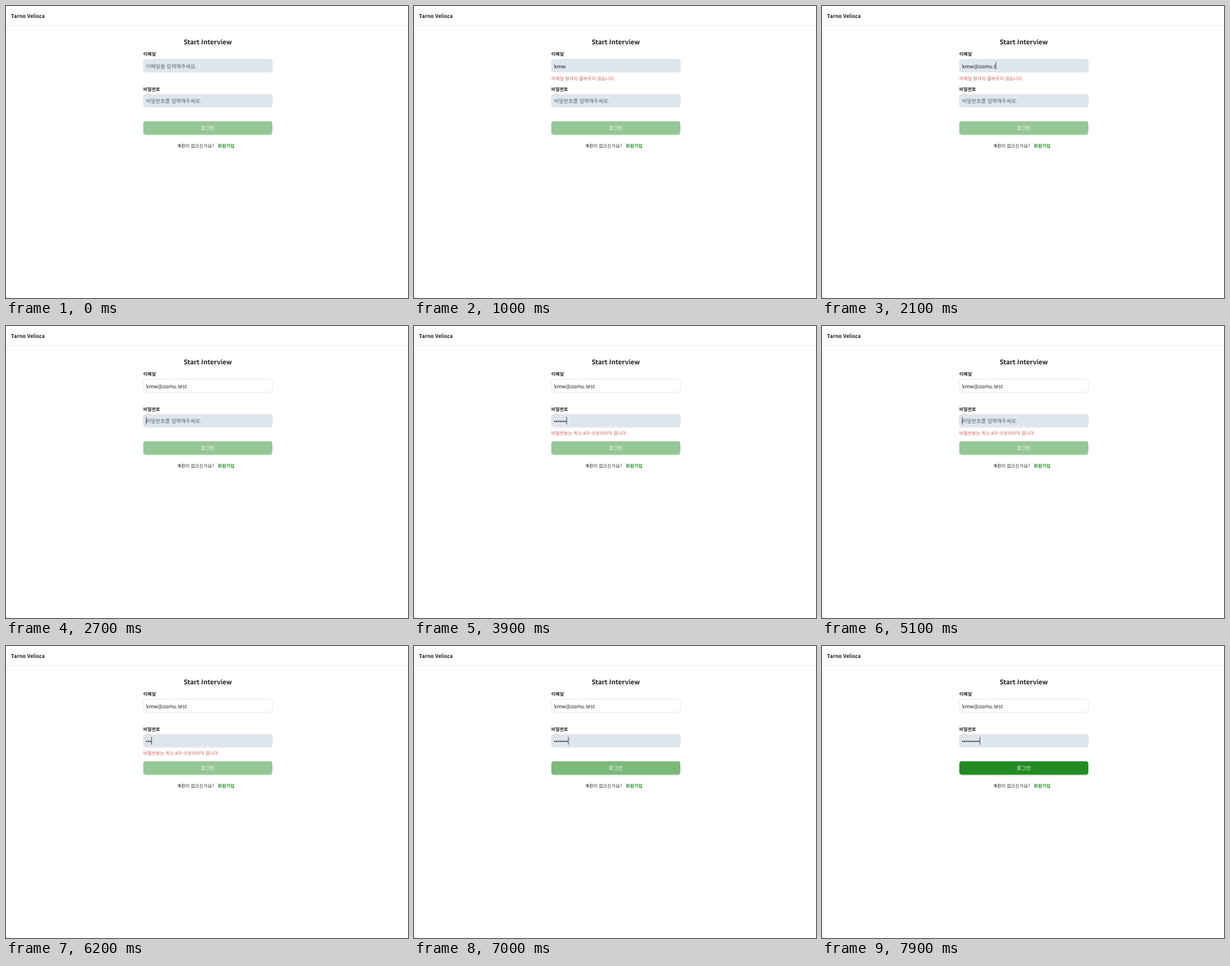
Animation of 640 by 464 pixels, one loop 8000 ms. Source, as an HTML page:

```html
<!DOCTYPE html>
<html lang="ko">
<head>
<meta charset="utf-8">
<title>Login form</title>
<style>
  html, body { margin: 0; width: 100%; height: 100%; overflow: hidden; background: #fff; }
  svg { display: block; width: 640px; height: 464px; }
  text {
    font: 8.28px "Noto Sans CJK KR", "Noto Sans KR", "Noto Sans CJK", "Noto Sans CJK JP", sans-serif;
    fill: #212121;
    text-rendering: geometricPrecision;
    white-space: pre;
  }
  .small { font-size: 7.25px; }
  .bold { font-weight: 600; }
  .medium { font-weight: 500; }
  .title { font-size: 10.36px; font-weight: 600; text-anchor: middle; }
  .hint { fill: #5b626c; }
  .error { fill: #cd5c5c; }
  .link { fill: #228b22; }
  .field { fill: #dfe6ee; stroke: #dbe1e8; stroke-width: .5; filter: drop-shadow(0 .6px .8px rgba(0, 0, 0, .07)); }
  .field.done { fill: #fff; stroke: #dadde2; }
  #button rect { fill: #228b22; filter: drop-shadow(0 1px 1.6px rgba(34, 139, 34, .3)); }
  #button text { fill: #fff; text-anchor: middle; }
</style>
</head>
<body>
<svg viewBox="0 0 640 464">
  <rect y="31" width="640" height="1" fill="#ececec"/>
  <path d="M0 462 Q0 464 2 464 H0Z" fill="#777"/>
  <text class="bold" x="8" y="19">Tarno Velisca</text>
  <text class="title" x="321.2" y="60.7">Start Interview</text>

  <text class="small bold" x="218.6" y="79">이메일</text>
  <rect class="field" id="emailBox" x="218.8" y="84.7" width="205.2" height="20.4" rx="4.1"/>
  <text class="hint" id="emailHint" x="222.9" y="98.5">이메일을 입력해주세요.</text>
  <text id="email" x="222.9" y="98.5"></text>
  <text class="small error" id="emailError" x="218.6" y="117.5">이메일 형식이 올바르지 않습니다.</text>

  <text class="small bold" x="218.6" y="134.7">비밀번호</text>
  <rect class="field" x="218.8" y="140.4" width="205.2" height="20.4" rx="4.1"/>
  <text class="hint" id="passHint" x="222.9" y="154.1">비밀번호를 입력해주세요.</text>
  <g id="dots" fill="#212121"></g>
  <text class="small error" id="passError" x="218.6" y="173.1">비밀번호는 최소 8자 이상이어야 합니다.</text>

  <g id="button">
    <rect x="218.7" y="183.2" width="205.3" height="21.2" rx="4.1"/>
    <text class="medium" x="321.3" y="197.2">로그인</text>
  </g>
  <text class="small" x="272.2" y="225.3">계정이 없으신가요?</text>
  <text class="small link bold" x="337" y="225.3">회원가입</text>
  <rect id="caret" width=".8" height="12" fill="#212121"/>
</svg>
<script>
  const LOOP = 8000, LEFT = 222.9, PITCH = 2.83, MAX_DOTS = 10, MIN_LENGTH = 8;
  const ADDRESS = "kmw@zomu.test";
  const EMAIL_KEYS = [300, 400, 500, 1150, 1300, 1500, 1600, 1700, 1900, 2000, 2150, 2250, 2350];
  const VALID_AT = 2250, BLUR_AT = 2600;
  const ERASE_AT = 4600, ERASE_STEP = 70;
  const FIRST_KEYS = [3100, 3230, 3350, 3480, 3600, 3720, 3850, 4000];
  const SECOND_KEYS = [5400, 5700, 6000, 6300, 6600, 6700, 6800, 6940, 7300, 7800];
  const FADE = 200, DIM = 0.475;
  const BUTTON_ON = [4000, 6940];

  const $ = id => document.getElementById(id);
  const show = (id, on) => $(id).setAttribute("visibility", on ? "visible" : "hidden");
  const count = (keys, t) => keys.filter(k => k <= t).length;
  const smooth = x => {
    x = Math.min(1, Math.max(0, x));
    return x * x * (3 - 2 * x);
  };

  for (let i = 0; i < MAX_DOTS; i++) {
    const dot = document.createElementNS("http://www.w3.org/2000/svg", "circle");
    dot.setAttribute("cx", LEFT + PITCH * (i + 0.5));
    dot.setAttribute("cy", 151.6);
    dot.setAttribute("r", 1.05);
    $("dots").append(dot);
  }

  const ERASE_KEYS = FIRST_KEYS.map((_, i) => ERASE_AT + i * ERASE_STEP);
  const EVENTS = [...EMAIL_KEYS, BLUR_AT, ...FIRST_KEYS, ...ERASE_KEYS, ...SECOND_KEYS];

  function drawCaret(t, emailLength, dots) {
    const last = Math.max(...EVENTS.filter(e => e <= t));
    show("caret", t >= EMAIL_KEYS[0] && (t - last) % 1000 < 500);
    const inEmail = t < BLUR_AT;
    const typed = inEmail
      ? (emailLength ? $("email").getComputedTextLength() : 0)
      : dots * PITCH;
    $("caret").setAttribute("x", LEFT + typed);
    $("caret").setAttribute("y", inEmail ? 88.9 : 144.5);
  }

  function draw(t) {
    const emailLength = count(EMAIL_KEYS, t);
    $("email").textContent = ADDRESS.slice(0, emailLength);
    show("emailHint", !emailLength);
    show("emailError", emailLength && t < VALID_AT);
    $("emailBox").classList.toggle("done", t >= BLUR_AT);

    const dots = count(FIRST_KEYS, t) - count(ERASE_KEYS, t) + count(SECOND_KEYS, t);
    [...$("dots").children].forEach((dot, i) =>
      dot.setAttribute("visibility", i < dots ? "visible" : "hidden"));
    show("passHint", !dots);
    show("passError", t >= FIRST_KEYS[0] && dots < MIN_LENGTH);

    const ready = smooth((t - BUTTON_ON[0]) / FADE) - smooth((t - ERASE_AT) / FADE)
      + smooth((t - BUTTON_ON[1]) / FADE);
    $("button").setAttribute("opacity", DIM + (1 - DIM) * ready);
    drawCaret(t, emailLength, dots);
  }

  const start = performance.now();
  function tick() {
    draw((performance.now() - start) % LOOP);
    requestAnimationFrame(tick);
  }
  tick();
</script>
</body>
</html>
```
